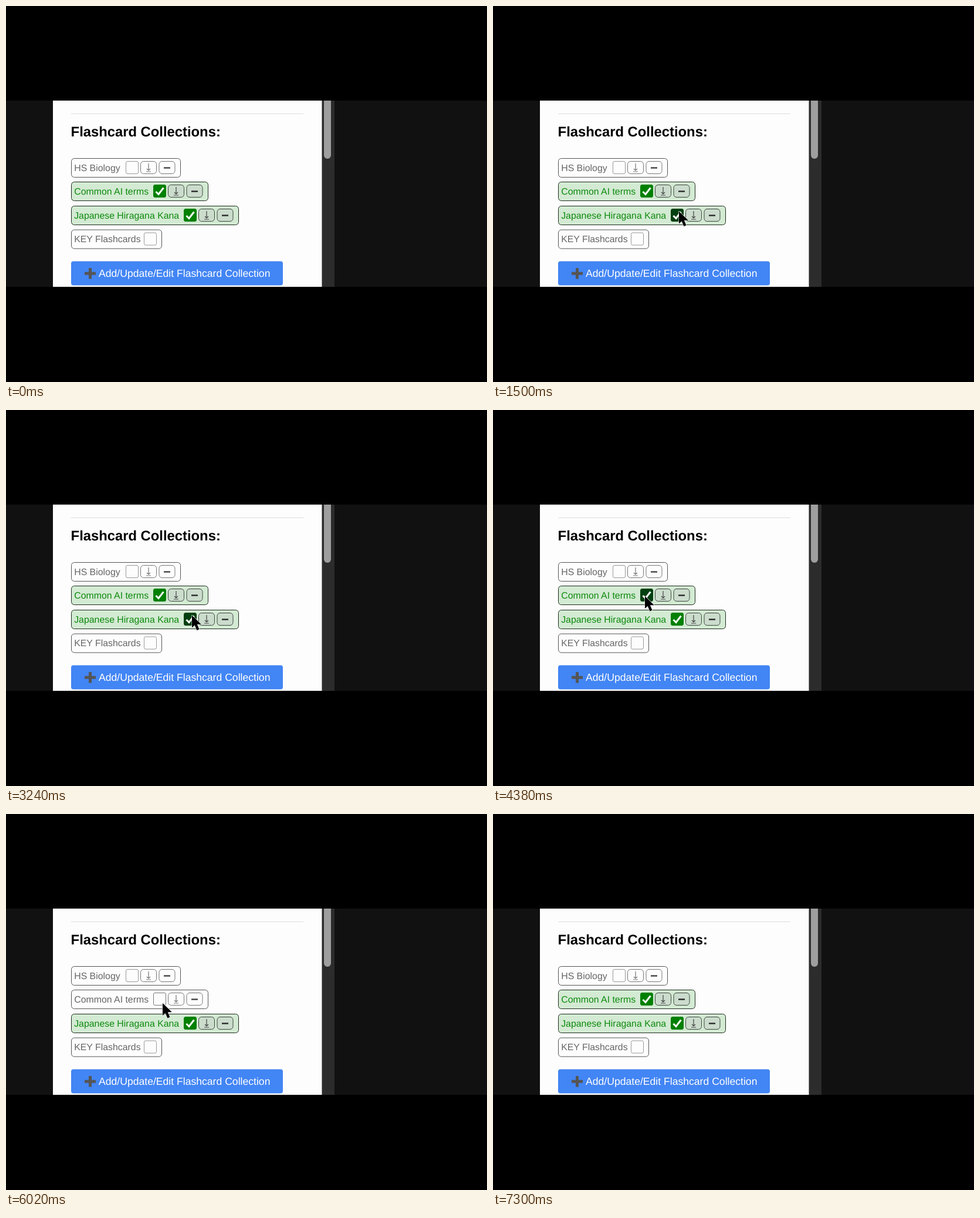
Animation of 820 by 640 pixels, one loop 7320 ms. Source, as an HTML page:

```html
<!DOCTYPE html>
<html>
<head>
<meta charset="utf-8">
<style>
  html, body { margin: 0; width: 100%; height: 100%; overflow: hidden; background: #000; }
  svg { display: block; }
  text { font: 15.87px "Liberation Sans", Arial, sans-serif; text-rendering: geometricPrecision; }
  #title { font-size: 23.8px; font-weight: bold; }
  #add { font-size: 17.6px; fill: #fff; }
  .chip { fill: #fdfdfd; stroke: #555; }
  .label { fill: #666; }
  .box { fill: #fdfdfd; stroke: #999; }
  .tick { display: none; fill: none; stroke: #fff; stroke-width: 3; }
  .btn rect { fill: #fdfdfd; stroke: #777; }
  .btn path { fill: none; stroke: #777; stroke-width: 1.2; }
  .btn .minus { stroke: #444; stroke-width: 2.4; }
  .on .chip { fill: #d3ead3; stroke: #1c2a1c; }
  .on .label { fill: #0d8a0d; }
  .on .box { fill: #008000; stroke: #008000; }
  .on .tick { display: inline; }
  .on .btn rect { fill: #cbdccd; stroke: #3c463c; }
  .on .btn path { stroke: #444; }
  .on .btn .minus { stroke: #2a2a2a; }
  .on .hover .box { fill: #004010; stroke: #004010; }
  .hover .box { stroke: #777; }
  .btn.hover rect, .on .btn.hover rect { fill: #a0c4a6; }
  #cursor path { fill: #000; stroke: #eee; stroke-width: 1.2; paint-order: stroke; stroke-linejoin: round; }
</style>
</head>
<body>
<svg width="820" height="640" viewBox="0 0 820 640">
  <rect width="820" height="640"/>
  <rect y="161" width="820" height="317" fill="#111"/>
  <rect x="80" y="161" width="459" height="317" fill="#fdfdfd"/>
  <rect x="538.5" y="161" width="21.5" height="317" fill="#2c2c2c"/>
  <path d="M542 161H554V254a6 6 0 0 1-12 0Z" fill="#9e9e9e"/>
  <path d="M111 183.5H507" stroke="#ddd"/>
  <text id="title" x="110.6" y="222">Flashcard Collections:</text>
  <g id="rows"></g>
  <rect x="111" y="434.5" width="361" height="41" rx="4" fill="#4285f4"/>
  <path d="M134 455.3H153M143.5 446V464.6" stroke="#555" stroke-width="5"/>
  <text id="add" x="158" y="461">Add/Update/Edit Flashcard Collection</text>
  <g id="cursor">
    <path id="arrow" d="M0 0V21L4.7 16.8L8.4 25.5L12.4 23.700L8.800 15.200H15.800Z"/>
    <path id="hand" d="M-3 2Q-3 0 0 0Q3 0 3 2V8Q5 7 7 9Q9 8 10 10Q13 9.500 13 12.500V19Q13 21 11 23V27H-2V23.500L-9 15.500Q-10 12.500-7 12.500L-3 15Z"/>
  </g>
</svg>
<script>
const LOOP = 7320;
const $ = id => document.getElementById(id);
const inside = (x, y, l, t, w, h) => x >= l && x <= l + w && y >= t && y <= t + h;

// label, checkbox x, row top, has buttons, time ranges in which it is checked
const rows = [
  ["HS Biology", 204.5, 259.5, true, []],
  ["Common AI terms", 251.5, 299.5, true, [[0, 4720], [6400, LOOP]]],
  ["Japanese Hiragana Kana", 303.5, 340.5, true, [[0, 1900], [3020, LOOP]]],
  ["KEY Flashcards", 235.5, 381, false, []]
];

function button(x, y, cls, d) {
  return `<g class="btn" data-hit="${x},${y},27,21">
    <rect x="${x}" y="${y}" width="27" height="21" rx="5"/>
    <path class="${cls}" transform="translate(${x + 13.5},${y + 10.5})" d="${d}"/></g>`;
}

$("rows").innerHTML = rows.map(([label, x, y, full]) => {
  const top = y + 5;
  return `<g>
    <rect class="chip" x="111.5" y="${y}" width="${x + (full ? 93 : 30) - 111.5}" height="32" rx="5"/>
    <text class="label" x="116.2" y="${y + 21}">${label}</text>
    <g data-hit="${x},${top},21,21">
      <rect class="box" x="${x}" y="${top}" width="21" height="21" rx="2.5"/>
      <path class="tick" d="M${x + 4} ${top + 11.5}l4.5 4.5l8.5-11"/>
    </g>` + (full ?
    button(x + 25, top, "down", "M0-7V5M-3 2L0 5L3 2M-4 7H4") +
    button(x + 56.5, top, "minus", "M-5.5 0.5H5.5") : "") + `</g>`;
}).join("");

const groups = [...$("rows").children];
const targets = [...document.querySelectorAll("[data-hit]")].map(el => ({
  el, hit: el.dataset.hit.split(",").map(Number), clickable: el.classList.contains("btn")
}));

// pointer stops: time, x, y
const stops = [
  [100, 578, 476], [780, 370, 358], [1020, 370, 358], [1420, 317, 349.5],
  [3350, 317, 349.5], [4200, 259, 317], [5300, 259, 317], [5950, 267, 322],
  [6640, 267, 322], [7260, 463, 466]
];

function pointer(t) {
  const i = stops.findIndex(s => s[0] > t);
  if (i < 1) return null;
  const [t0, x0, y0] = stops[i - 1], [t1, x1, y1] = stops[i];
  const p = (t - t0) / (t1 - t0), k = p * p * (3 - 2 * p);
  return [x0 + (x1 - x0) * k, y0 + (y1 - y0) * k];
}

function draw(now) {
  const t = now % LOOP;
  rows.forEach((r, i) =>
    groups[i].classList.toggle("on", r[4].some(([a, b]) => t >= a && t < b)));

  const pos = pointer(t);
  let hand = !!pos && inside(...pos, 111, 434.5, 361, 41);
  for (const { el, hit, clickable } of targets) {
    const over = !!pos && inside(...pos, ...hit);
    el.classList.toggle("hover", over);
    hand ||= over && clickable;
  }
  $("cursor").style.display = pos ? "" : "none";
  if (pos) $("cursor").setAttribute("transform", `translate(${pos})`);
  $("hand").style.display = hand ? "" : "none";
  $("arrow").style.display = hand ? "none" : "";
}

const start = performance.now();
function tick() {
  draw(performance.now() - start);
  requestAnimationFrame(tick);
}
tick();
</script>
</body>
</html>
```
